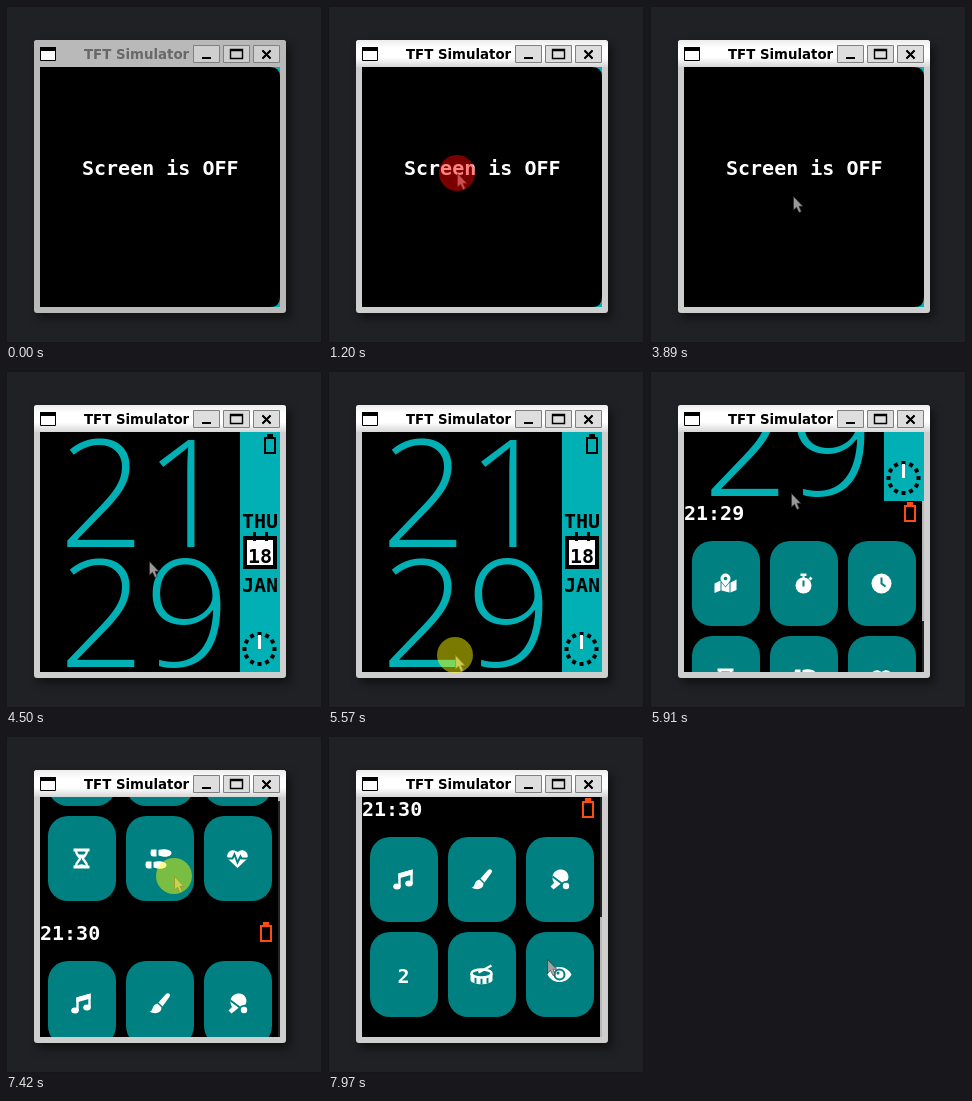
These frames come from a looping animation (316x337 px, 8000 ms). An HTML page:

```html
<!DOCTYPE html>
<html lang="en">
<head>
<meta charset="utf-8">
<title>TFT Simulator</title>
<style>
html, body { margin: 0; width: 100%; height: 100%; overflow: hidden; background: #202124; }
svg { display: block; width: 100vw; height: 100vh; }
.title { font: bold 13.33px "DejaVu Sans", sans-serif; }
.mono { font: bold 20px "DejaVu Sans Mono", monospace; }
.big { font: 300 150px "Open Sans", sans-serif; fill: #00b0b4; }
.frame { fill: #cecece; }
.bar { fill: url(#shine); }
.button { fill: #dedede; stroke: #808080; }
.idle .frame { fill: #b9b9b9; }
.idle .bar { fill: #b9b9b9; }
.idle .button { fill: #cfcfcf; }
.idle .title { fill: #686868; }
.icon { fill: #fff; stroke: none; }
.icon .cut { fill: none; stroke: #008080; stroke-width: 2; }
.icon .hole { fill: #008080; }
.icon .line { fill: none; stroke: #fff; stroke-width: 2.4; }
</style>
</head>
<body>
<svg viewBox="0 0 316 337" preserveAspectRatio="none">
  <defs>
    <linearGradient id="shine" x2="0" y2="1">
      <stop stop-color="#ececec"/><stop offset=".3" stop-color="#fff"/>
      <stop offset=".65" stop-color="#fff"/><stop offset="1" stop-color="#d6d6d6"/>
    </linearGradient>
    <clipPath id="glass"><path d="M34 61h240v240h-240z"/></clipPath>
  </defs>
  <path d="M.5 .5h315v336h-315z" fill="#202124" stroke="#15161a"/>
  <g id="win">
    <rect class="frame" x="28" y="34" width="252" height="273" rx="3" style="filter:drop-shadow(4px 5px 5px rgba(0,0,0,.5))"/>
    <path class="bar" d="M28 61V37q0-3 3-3h246q3 0 3 3v24z"/>
    <path d="M34.5 41.5h15v13h-15z" fill="#fff" stroke="#000"/>
    <path d="M34 41h16v4h-16z"/>
    <text class="title" x="78" y="53">TFT Simulator</text>
    <path class="button" d="M187.5 39.5h26v17h-26zm30 0h26v17h-26zm30 0h26v17h-26z"/>
    <path d="M196 51h9v2h-9z"/>
    <path d="M224.5 43.5h12v9h-12zm0 1h12M256.500 44.500l8 8m0-8l-8 8" fill="none" stroke="#000" stroke-width="1.4"/>
    <path d="M256.500 44.500l8 8m0-8l-8 8" stroke="#000" stroke-width="2"/>
  </g>
  <g clip-path="url(#glass)">
    <path d="M34 61h240v240h-240z"/>
    <g id="pages"></g>
    <g id="off">
      <path d="M34 61h240v240h-240z" fill="#00b0b4"/>
      <path d="M34 61h230q10 0 10 10v220q0 10-10 10h-230z"/>
      <text class="mono" x="76" y="169" fill="#fff">Screen is OFF</text>
    </g>
  </g>
  <path id="cursor" d="M.5 .5V14L3.500 11.300 6 16.500 8.300 15.500 6 10.300H9.800Z" fill="#a8a8a8" stroke="#333" stroke-width=".7" opacity=".92"/>
  <circle id="press" r="18" fill-opacity=".48"/>
</svg>
<script>
const $ = id => document.getElementById(id);
const path = (d, cls = '') => `<path class="${cls}" d="${d}"/>`;
const dot = (x, y, r, cls = '') => `<circle class="${cls}" cx="${x}" cy="${y}" r="${r}"/>`;
const oval = (x, y, rx, ry) => `<ellipse cx="${x}" cy="${y}" rx="${rx}" ry="${ry}"/>`;
const mono = (s, x, y, fill = '#000', anchor = 'middle') =>
  `<text class="mono" x="${x}" y="${y}" fill="${fill}" text-anchor="${anchor}">${s}</text>`;
const battery = (x, y, color) =>
  `<path d="M${x + 1} ${y + 4}h10v15h-10z" fill="none" stroke="${color}" stroke-width="2"/>
   <path d="M${x + 3} ${y}h6v4h-6z" fill="${color}"/>`;

const icons = {
  map: path('M-11 0L-5-3V7L-11 9.500ZM-4-1L0 4 4-1V9L-4 7ZM5-1L11-4V6.500L5 9Z') +
    path('M0 3C-2 0-5-2-5-5A5 5 0 0 1 5-5C5-2 2 0 0 3Z') + dot(0, -5, 1.8, 'hole'),
  stopwatch: dot(0, 2, 8) + path('M-3-10h6v2.500h-2v3h-2v-3h-2zM5-5l2-2 2 2-2 2z') + path('M0 3V-3', 'cut'),
  clock: dot(0, 0, 10) + path('M0-6V0L4 3', 'cut'),
  hourglass: path('M-8-10H8v3H-8zM-8 7H8v3H-8z') +
    path('M-5.500-8C-5.500-3-1.500-2-1.500 0S-5.500 3-5.500 8M5.500-8C5.500-3 1.500-2 1.500 0S5.500 3 5.500 8', 'line') +
    path('M-4-4H4L0 0ZM-4 8C-3 5 3 5 4 8Z'),
  shoes: path('M-8-9h5v7h-3q-3 0-3-3.500 0-3 1-3.500zM-13 3h5v7h-3q-3 0-3-3.500 0-3 1-3.500z') +
    path('M-1-8.500C4-10 12-9 12-5.500S5-1 3-2L-1-3ZM-6 3.500C-1 2 7 3 7 6.500S0 11-2 10L-6 9Z'),
  heart: path('M0 9.500L-9 1C-13-4-7-12 0-6.500 7-12 13-4 9 1Z') + path('M-11 0H-5L-3-4 0 4 3-2 4 0H11', 'cut'),
  music: path('M-4 7V-5L8-8.500V4', 'line') + path('M-5-6L9-10V-5L-5-1Z') + oval(-6.5, 7, 3.8, 3) + oval(5.5, 4, 3.8, 3),
  brush: path('M9.500-10q2 1 0 4L3 3 -1-1 6-9q2-2 3.500-1z') + path('M-2 0L2 4C2 10-5 11-10 8-6 8-8 1-2 0Z'),
  paddle: path('M-5 4C-9-1-7-9 0-10 7-11 11-4 8 1L4 2-1 6Z') + path('M-7-3L5 6', 'cut') +
    path('M-5 3L-1 6-6 10-9 7Z') + dot(6.5, 6.5, 3.2),
  two: mono('2', 0, 8, '#fff'),
  drum: path('M-11-1V6C-8 11 8 11 11 6V-1C8 4-8 4-11-1Z') + path('M-6 2V9M0 3V10M6 2V9', 'cut') +
    `<ellipse class="line" cy="-1" rx="10" ry="4"/>` + path('M-3-2L10-9', 'line'),
  eye: path('M-12 0C-7-10 7-10 12 0 7 10-7 10-12 0Z') + dot(0, 0, 5, 'cut') + dot(-1.5, -1.5, 1.5, 'hole')
};

function clockFace() {
  let ticks = '';
  for (let a = 0; a < 360; a += 30)
    ticks += `<path d="M251.500 261h4v4h-4z" transform="rotate(${a} 253.500 278)"/>`;
  return `<text class="big" x="53" y="176">21</text><text class="big" x="53" y="296">29</text>
    <path d="M234 61h40v240h-40z" fill="#00b0b4"/>` +
    battery(258, 63, '#000') + mono('THU', 254, 157) +
    `<path d="M239 167h30v29h-30z" fill="#fff" stroke="#000" stroke-width="4"/>
     <path d="M248.500 161v9M260.500 161v9" stroke="#000" stroke-width="3"/>` +
    mono('18', 254, 192) + mono('JAN', 254, 221) + ticks +
    '<path d="M253.500 264v14" stroke="#fff" stroke-width="3"/>';
}

function menu(index, time, names) {
  const tiles = names.map((name, i) => {
    const x = 42 + i % 3 * 78, y = 101 + (i > 2) * 95;
    return `<rect x="${x}" y="${y}" width="68" height="85" rx="20" fill="#008080"/>
      <g class="icon" transform="translate(${x + 33.5} ${y + 42.5})">${icons[name]}</g>`;
  }).join('');
  return `<g transform="translate(0 ${240 * (index + 1)})">` + tiles +
    mono(time, 34, 80, '#fff', 'start') + battery(254, 62, '#ff4a10') +
    `<path d="M272 61h2v240h-2z" fill="#222"/>
     <path d="M272 ${61 + 120 * index}h2v120h-2z" fill="#b8b8b8"/></g>`;
}

$('pages').innerHTML = clockFace() +
  menu(0, '21:29', ['map', 'stopwatch', 'clock', 'hourglass', 'shoes', 'heart']) +
  menu(1, '21:30', ['music', 'brush', 'paddle', 'two', 'drum', 'eye']);

// Pointer moves: start time, then one x,y pair every 70 ms
const moves = [
  [330, 221,279, 200,256, 176,234],
  [1200, 129,167],
  [2980, 150,182, 180,204, 212,228, 240,248, 258,260, 266,265,
    262,258, 250,246, 232,234, 212,222, 192,211, 173,201, 155,194, 143,190],
  [5230, 148,235, 139,288, 127,284],
  [5700, 129,245, 133,196, 138,150, 141,122],
  [6250, 150,130, 165,145, 180,165, 190,185, 195,205, 193,225, 188,240, 182,252, 176,261, 171,266],
  [7280, 171,240, 170,195, 168,140, 166,100, 166,90],
  [7830, 190,150, 225,228, 219,223]
];
// Button presses: from, to, colour
const presses = [[1200, 1330, '#f00'], [4290, 4430, '#ff0'], [5570, 5910, '#ff0'], [7080, 7490, '#ff0']];

function pointer(t) {
  const m = moves.filter(m => m[0] <= t).pop();
  if (!m) return null;
  const i = Math.min(Math.floor((t - m[0]) / 70), (m.length - 3) / 2);
  return [m[1 + 2 * i], m[2 + 2 * i]];
}

// One page rolls up in 55 px steps
const roll = (t, start) => t < start ? 0 : Math.min(240, 6 + 55 * Math.floor((t - start) / 70));

function draw(now) {
  const t = now % 8000, p = pointer(t);
  const press = presses.find(([a, b]) => t >= a && t < b);
  const blink = t >= 1660 && t < 1730;
  $('win').setAttribute('class', t < 1200 ? 'idle' : '');
  $('off').style.display = t < 4360 ? '' : 'none';
  $('pages').setAttribute('transform', `translate(0 ${-roll(t, 5700) - roll(t, 7280)})`);
  $('cursor').style.display = p && !blink ? '' : 'none';
  $('press').style.display = press ? '' : 'none';
  if (p) for (const id of ['cursor', 'press']) $(id).setAttribute('transform', `translate(${p})`);
  if (press) $('press').setAttribute('fill', press[2]);
}

let start;
function tick(now) {
  start ??= now;
  draw(now - start);
  requestAnimationFrame(tick);
}
draw(0);
requestAnimationFrame(tick);
</script>
</body>
</html>
```
